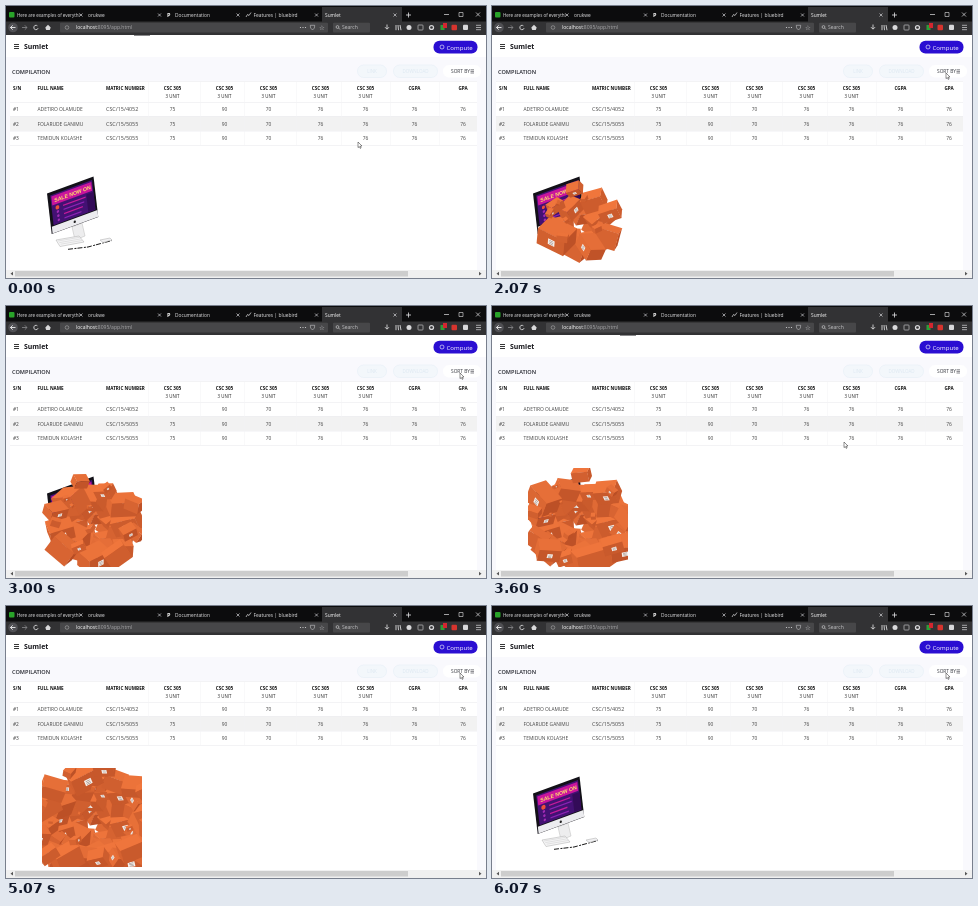
Recreate the animation shown at these times as an HTML page with a canvas. Size 480 px wide and 272 px high, loop 6190 ms.

```html
<!DOCTYPE html>
<html lang="en">
<head>
<meta charset="utf-8">
<title>Compilation</title>
<style>
html, body { margin: 0; width: 100%; height: 100%; overflow: hidden; background: #fff; }
canvas { display: block; width: 480px; height: 272px; }
</style>
</head>
<body>
<canvas id="stage"></canvas>
<script>
const W = 480, H = 272, LOOP = 6190, STEP = 200 / 3, LAST = 91;
const canvas = document.getElementById('stage');
const ctx = canvas.getContext('2d');
const dpr = window.devicePixelRatio || 1;
canvas.width = W * dpr;
canvas.height = H * dpr;

const SANS = '"Open Sans", "Noto Sans", sans-serif';
const clamp = v => Math.max(0, Math.min(1, v));
const easeOut = p => 1 - (1 - p) ** 3;
const easeInOut = p => p * p * (3 - 2 * p);
const mix = (a, b, p) => a + (b - a) * p;

function rect(x, y, w, h, fill) {
  ctx.fillStyle = fill;
  ctx.fillRect(x, y, w, h);
}

function stroke(color, width) {
  ctx.strokeStyle = color;
  ctx.lineWidth = width;
  ctx.stroke();
}

function pill(x, y, w, h, r, fill, edge) {
  ctx.beginPath();
  ctx.roundRect(x, y, w, h, r);
  if (fill) { ctx.fillStyle = fill; ctx.fill(); }
  if (edge) stroke(edge, 0.6);
}

function dot(x, y, r, fill) {
  ctx.beginPath();
  ctx.arc(x, y, r, 0, Math.PI * 2);
  ctx.fillStyle = fill;
  ctx.fill();
}

function arc(x, y, r, from, to, color, width) {
  ctx.beginPath();
  ctx.arc(x, y, r, from, to);
  stroke(color, width);
}

function trace(points, closed) {
  ctx.beginPath();
  points.forEach(([x, y], i) => i ? ctx.lineTo(x, y) : ctx.moveTo(x, y));
  if (closed) ctx.closePath();
}

function line(points, color, width = 0.8) {
  trace(points);
  stroke(color, width);
}

function poly(points, fill, edge) {
  trace(points, true);
  ctx.fillStyle = fill;
  ctx.fill();
  if (edge) stroke(edge, 0.5);
}

function text(str, x, y, size, color, weight = 400, align = 'left', family = SANS) {
  ctx.font = `${weight} ${size}px ${family}`;
  ctx.textAlign = align;
  ctx.fillStyle = color;
  ctx.fillText(str, x, y);
}

function cross(x, y, r, color) {
  line([[x - r, y - r], [x + r, y + r]], color, 0.7);
  line([[x - r, y + r], [x + r, y - r]], color, 0.7);
}

// Horizontal arrow; dir is -1 for left and 1 for right.
function arrow(x, y, dir, color) {
  const tip = x + 2.5 * dir;
  line([[x - 2.5 * dir, y], [tip, y]], color);
  line([[tip - 2.2 * dir, y - 2.2], [tip, y], [tip - 2.2 * dir, y + 2.2]], color);
}

function menu(x, y, w, gap, color, width) {
  for (let i = -1; i <= 1; i++) line([[x, y + i * gap], [x + w, y + i * gap]], color, width);
}

function drawTabs() {
  const ink = '#e4e4e6';
  rect(0, 0, W, 16, '#0c0c0d');
  rect(316, 1, 80, 15, '#323234');
  pill(3, 6, 5.5, 5.5, 1, '#29a329');
  ctx.save();
  ctx.beginPath();
  ctx.rect(11, 0, 63, 16);
  ctx.clip();
  text('Here are examples of everything', 11, 10.8, 4.5, ink);
  ctx.restore();
  text('orukwe', 82, 10.8, 4.8, ink);
  text('P', 161, 11, 5.5, '#fff', 700);
  text('Documentation', 169, 10.8, 4.8, ink);
  line([[240, 11], [241.5, 8.5], [243, 9.5], [245, 6.5]], ink, 0.7);
  text('Features | bluebird', 247.5, 10.8, 4.9, ink);
  text('Sumlet', 319, 10.8, 4.8, '#fff');
  for (let i = 0; i < 5; i++) cross(75 + i * 78.5, 9, 1.5, '#d0d0d4');
  line([[400, 9], [405, 9]], ink);
  line([[402.5, 6.5], [402.5, 11.5]], ink);
  line([[438, 8.5], [443, 8.5]], ink, 0.7);
  pill(453, 6.5, 4, 4, 0, null, ink);
  cross(472, 8.5, 2, ink);
}

function drawToolbar(loading) {
  const ink = '#d8d8da', bar = '#323234', field = '#474749', y = 21.5;
  rect(0, 15.5, W, 13.5, bar);
  dot(7, y, 4.8, '#505054');
  arrow(7, y, -1, '#fff');
  arrow(18.5, y, 1, '#8a8a8c');
  arc(30, y, 2.2, 0.3, 5.4, ink, 0.9);
  poly([[39.3, y], [42, 18.8], [44.7, y], [43.8, 24], [40.2, 24]], ink);

  pill(54, 16.8, 268, 9.8, 1, field);
  arc(61, y, 1.8, 0, 7, '#aaa', 0.6);
  text('localhost', 70, 23.4, 5, '#fff');
  text(':8095/app.html', 90.5, 23.4, 5, '#a8a8aa');
  for (let i = 0; i < 3; i++) dot(294.5 + i * 2.5, y, 0.6, ink);
  poly([[304.3, 19.3], [308.7, 19.3], [308.4, 22], [306.5, 24], [304.6, 22]], field, ink);
  text('☆', 313, 24, 6.5, ink, 400, 'left', '"DejaVu Sans", sans-serif');

  pill(327, 16.8, 37, 9.8, 1, field);
  arc(331.5, 21, 1.4, 0, 7, ink, 0.6);
  line([[332.6, 22], [334, 23.5]], ink, 0.6);
  text('Search', 336, 23.4, 5, '#c4c4c6');

  line([[381, 18.5], [381, 23]], ink, 0.9);
  line([[379, 21.2], [381, 23.2], [383, 21.2]], ink, 0.9);
  for (let i = 0; i < 3; i++) line([[390 + i * 2, 19], [390 + i * 2.5, 24.2]], ink, 0.9);
  dot(403, y, 2.5, ink);
  pill(412, 19, 5, 5, 0.7, null, ink);
  dot(425.5, y, 2.6, ink);
  dot(425.5, y, 1.3, bar);
  rect(434.5, 19, 4, 5, '#2d9b38');
  rect(437, 17, 4, 5, '#d32630');
  pill(445.5, 18.7, 5.5, 5.5, 1, '#d7342e');
  pill(457, 18.8, 5, 5.2, 1, ink);
  menu(470, y, 5, 2.2, ink, 0.7);
  if (loading) rect(128, 29, 16, 1, '#8a8a8c');
}

function drawPage() {
  rect(0, 28, W, 244, '#fff');
  menu(8, 40.5, 5, 2, '#222', 0.9);
  text('Sumlet', 18, 43.3, 6.9, '#15151a', 700);
  pill(427.5, 34.7, 44, 12.7, 6, '#2a0ed2');
  arc(436, 41, 2, 0, 7, '#fff', 0.6);
  text('Compute', 440.5, 43.6, 6.1, '#fff');

  rect(0, 51, W, 213, '#f9f9fd');
  text('COMPILATION', 6, 67.5, 5.6, '#24262e', 600);
  pill(351.5, 59, 29, 12.5, 6, '#f3f7fb', '#e6eff6');
  text('LINK', 366, 67, 4.5, '#dce7f1', 400, 'center');
  pill(387.5, 59, 44, 12.5, 6, '#f3f7fb', '#e6eff6');
  text('DOWNLOAD', 409.5, 67, 4.5, '#dce7f1', 400, 'center');
  pill(437, 59, 38, 12.5, 6, '#fff');
  text('SORT BY', 445, 67.2, 4.8, '#30323a');
  menu(464.5, 65.4, 3.5, 1.6, '#30323a', 0.6);
}

const COLS = [166.5, 218.5, 262.5, 314.5, 359.5, 408.5, 457];
const SCORES = [75, 90, 70, 76, 76, 76, 76];
const STUDENTS = [
  ['#1', 'ADETIRO OLAMUDE', 'CSC/15/4052'],
  ['#2', 'FOLARUDE GANIMU', 'CSC/15/5055'],
  ['#3', 'TEMIDUN KOLASHE', 'CSC/15/5055']
];

function drawTable() {
  const rowTop = i => 96 + i * 14.4;
  const head = (str, x, align) => text(str, x, 84.3, 4.6, '#111', 700, align);
  rect(4, 75, 467, 189, '#fff');
  rect(4, rowTop(1), 467, 14.4, '#f2f2f2');
  rect(4, 75, 467, 0.6, '#ececef');
  for (let i = 0; i < 4; i++) rect(4, rowTop(i), 467, 0.6, '#ececef');
  head('S/N', 7);
  head('FULL NAME', 31.5);
  head('MATRIC NUMBER', 100);
  COLS.forEach((x, i) => {
    rect(x - 24, 75, 0.5, 64, '#f3f3f5');
    head(['CGPA', 'GPA'][i - 5] || 'CSC 305', x, 'center');
    if (i < 5) text('3 UNIT', x, 91.8, 4.4, '#222', 400, 'center');
  });
  STUDENTS.forEach(([id, name, matric], row) => {
    const y = rowTop(row) + 9.4;
    text(id, 7, y, 4.8, '#333');
    text(name, 31.5, y, 4.9, '#444');
    text(matric, 100, y, 5.4, '#444');
    COLS.forEach((x, i) => text(SCORES[i], x, y, 4.9, '#444', 400, 'center'));
  });
  rect(0, 264, W, 8, '#f0f0f0');
  rect(9, 265, 393, 5.5, '#cdcdcd');
  poly([[4.5, 267.7], [7, 265.8], [7, 269.6]], '#555');
  poly([[475.5, 267.7], [473, 265.8], [473, 269.6]], '#555');
}

function drawComputer(t) {
  poly([[66, 221], [76, 217], [79, 230], [69, 234]], '#ededee', '#bbb');
  poly([[50, 234], [73, 230], [78, 236], [54, 240.5]], '#f5f5f6', '#aaa');
  for (let i = 0; i < 3; i++) line([[52 + i * 1.3, 235 + i * 1.6], [73.5 + i * 1.3, 231.3 + i * 1.6]], '#ccc', 0.5);
  ctx.setLineDash([5, 1.5, 2, 1]);
  line([[62, 243.3], [82, 241], [106, 234.5]], '#151515', 1);
  ctx.setLineDash([]);
  poly([[94, 234], [104, 232], [106, 234], [97, 236.5]], '#f0f0f2', '#aaa');

  ctx.save();
  ctx.transform(0.94, -0.345, 0.115, 0.99, 41, 187.5);
  rect(0, 0, 49.5, 41, '#121017');
  rect(1, 34, 48.5, 6.7, '#ececef');
  dot(25, 37.3, 1.2, '#222');
  rect(3, 3, 44.5, 30, '#431173');
  rect(4, 4.5, 42.5, 9, '#c9149c');
  text('SALE NOW ON', 26, 11.2, 5.4, '#ffe26a', 700, 'center', '"Liberation Sans", Arial, sans-serif');
  const beat = Math.sin(t / 180);
  for (let i = 0; i < 4; i++) {
    const y = 16.5 + i * 4.2;
    rect(15, y, 24 - i * 2 + 2 * beat * (i % 2 ? 1 : -1), 1.3, i % 2 ? '#8c22b4' : '#c61a9b');
    dot(9, y + 0.6, i ? 1.3 : 2 + beat * 0.4, i ? '#a12bb5' : '#ee5038');
  }
  rect(40, 15, 7.5, 17.5, '#330b58');
  ctx.restore();
}

const noise = n => {
  const v = Math.sin(n * 127.1 + 31.7) * 43758.5453;
  return v - Math.floor(v);
};

function rotate([x, y, z], [rx, ry, rz]) {
  [x, z] = [x * Math.cos(ry) + z * Math.sin(ry), z * Math.cos(ry) - x * Math.sin(ry)];
  [y, z] = [y * Math.cos(rx) - z * Math.sin(rx), y * Math.sin(rx) + z * Math.cos(rx)];
  return [x * Math.cos(rz) - y * Math.sin(rz), x * Math.sin(rz) + y * Math.cos(rz), z];
}

function drawBox(x, y, size, turn, seed) {
  const dims = [size, size * mix(0.55, 0.8, noise(seed + 9)), size * 0.75];
  const axes = [[1, 0, 0], [0, 1, 0], [0, 0, 1]].map(a => rotate(a, turn));
  axes.forEach((axis, i) => {
    const sign = axis[2] < 0 ? -1 : 1;
    const n = axis.map(v => v * sign);
    const j = (i + 1) % 3, k = (i + 2) % 3;
    const u = axes[j].map(v => v * dims[j]), v = axes[k].map(c => c * dims[k]);
    const lit = clamp(0.45 - 0.45 * n[1] - 0.25 * n[0] + 0.2 * n[2]);
    ctx.save();
    ctx.transform(u[0], u[1], v[0], v[1], x + n[0] * dims[i], y + n[1] * dims[i]);
    rect(-1.02, -1.02, 2.04, 2.04, `rgb(${mix(182, 240, lit)}, ${mix(76, 118, lit)}, ${mix(36, 60, lit)})`);
    if (i === 2 && seed % 2) {
      rect(-0.2, -0.35, 0.5, 0.72, '#f6efea');
      for (let row = 0; row < 3; row++) rect(-0.1, -0.2 + row * 0.2, 0.3, 0.07, '#8c7a74');
    }
    ctx.restore();
  });
}

// Boxes leave the screen one by one and settle on a widening sunflower spiral.
const PILE = { first: 720, gap: 65, clear: 5800, spread: 8.2, x: 90, y: 222, floor: 252 };
const GOLDEN = Math.PI * (3 - Math.sqrt(5));

function drawBoxes(t) {
  if (t >= PILE.clear) return;
  ctx.save();
  ctx.beginPath();
  ctx.rect(36, 162, 100, 99);
  ctx.clip();
  for (let i = 0; PILE.first + i * PILE.gap <= t; i++) {
    const p = clamp((t - PILE.first - i * PILE.gap) / 800), e = easeOut(p);
    const radius = PILE.spread * Math.sqrt(i + 2), angle = i * GOLDEN;
    const restX = PILE.x + radius * Math.cos(angle);
    const restY = Math.min(PILE.floor, PILE.y + 0.9 * radius * Math.sin(angle));
    const x = mix(66, restX, e);
    const y = mix(199, restY, e) - 10 * Math.sin(Math.PI * p);
    const size = mix(8, 16, noise(i + 20)) * mix(0.15, 1, easeInOut(p));
    const spin = (1 - e) * 1.6;
    drawBox(x, y, size, [
      -0.3 - 0.6 * noise(i),
      (noise(i + 50) - 0.5) * 1.8 + spin,
      (noise(i + 90) - 0.5) * 1.4 - spin * 0.5
    ], i);
  }
  ctx.restore();
}

function drawPointer(t) {
  const trip = t < 3450 ? clamp((t - 1370) / 400) : clamp((t - 4500) / 450);
  const e = easeInOut(trip);
  ctx.save();
  ctx.translate(mix(352, 454, e), mix(136, 67, e));
  poly([[0, 0], [0, 5.6], [1.3, 4.5], [2.2, 6.4], [3.1, 6], [2.3, 4.1], [4, 4]], '#fff', '#222');
  ctx.restore();
}

function draw(t) {
  ctx.setTransform(dpr, 0, 0, dpr, 0, 0);
  drawPage();
  drawTable();
  drawTabs();
  drawToolbar(t < 200 || (t >= 3450 && t < 3670));
  drawComputer(t);
  drawBoxes(t);
  drawPointer(t);
}

const begin = performance.now();
function tick() {
  const now = (performance.now() - begin) % LOOP;
  draw(Math.min(LAST, Math.floor((now + 4) / STEP)) * STEP);
  requestAnimationFrame(tick);
}
tick();
</script>
</body>
</html>
```
